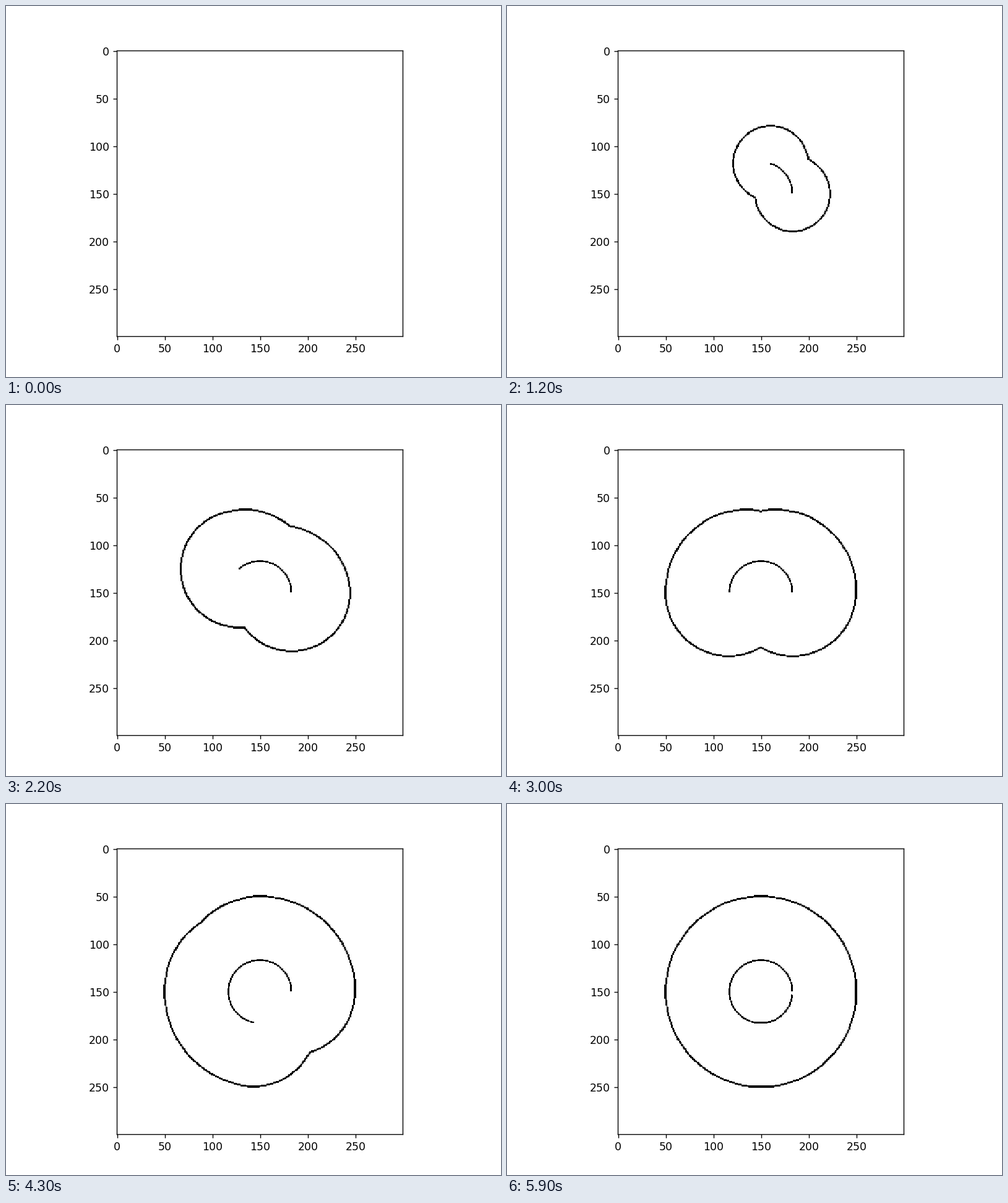
A matplotlib script that plays this animation: 800x600 px, repeating every 6 s.

```python
import numpy as np
import matplotlib.pyplot as plt
from matplotlib.animation import FuncAnimation

SIZE = 300          # cells per side of the grid
FRAMES = 60
STEP = 360 // FRAMES
RADIUS = 33.4       # radius of the growing arc
CENTRE = 149.87
LO, HI = 44, 256    # part of the grid the outline can reach

# Arc points at every degree, snapped to the grid
degrees = np.arange(360)
theta = np.radians(degrees)
px = np.floor(CENTRE + RADIUS * np.cos(theta) + 0.5)
py = np.floor(CENTRE - RADIUS * np.sin(theta) + 0.5)

# Distance of every cell to every arc point
cells = np.arange(LO, HI, dtype=np.float32)
dx = (cells - px[:, None]).astype(np.float32)
dy = (cells - py[:, None]).astype(np.float32)
dist = np.sqrt(dy[:, :, None] ** 2 + dx[:, None, :] ** 2)

# Polar coordinates for drawing the arc itself
gy, gx = np.mgrid[:SIZE, :SIZE] - 149.75
ring = np.abs(np.hypot(gx, gy) - 33.1) < 0.85
angle = np.degrees(np.arctan2(-gy, gx)) % 360


def outline(end):
    """Edge of all discs centred on the arc that reach its farthest point."""
    t = degrees[:end + 1]
    apart = np.minimum(np.maximum(t, end - t), 180)
    reach = np.ceil(2 * RADIUS * np.sin(np.radians(apart) / 2))
    reach = reach.astype(np.float32)[:, None, None]
    depth = (reach - dist[:end + 1]).max(axis=0)
    return (depth > -0.3) & (depth < 1.6)


def picture(n):
    img = np.ones((SIZE, SIZE))
    if n > 0:
        end = n * STEP
        img[LO:HI, LO:HI][outline(end)] = 0
        img[ring & (angle <= end + 0.3)] = 0
    return img


fig, ax = plt.subplots(figsize=(6.4, 4.8), dpi=125)
image = ax.imshow(picture(0), cmap="gray", vmin=0, vmax=1,
                  interpolation="nearest")


def update(n):
    image.set_data(picture(n))
    return [image]


anim = FuncAnimation(fig, update, frames=FRAMES, interval=100,
                     repeat=True, repeat_delay=0)
plt.show()
```
